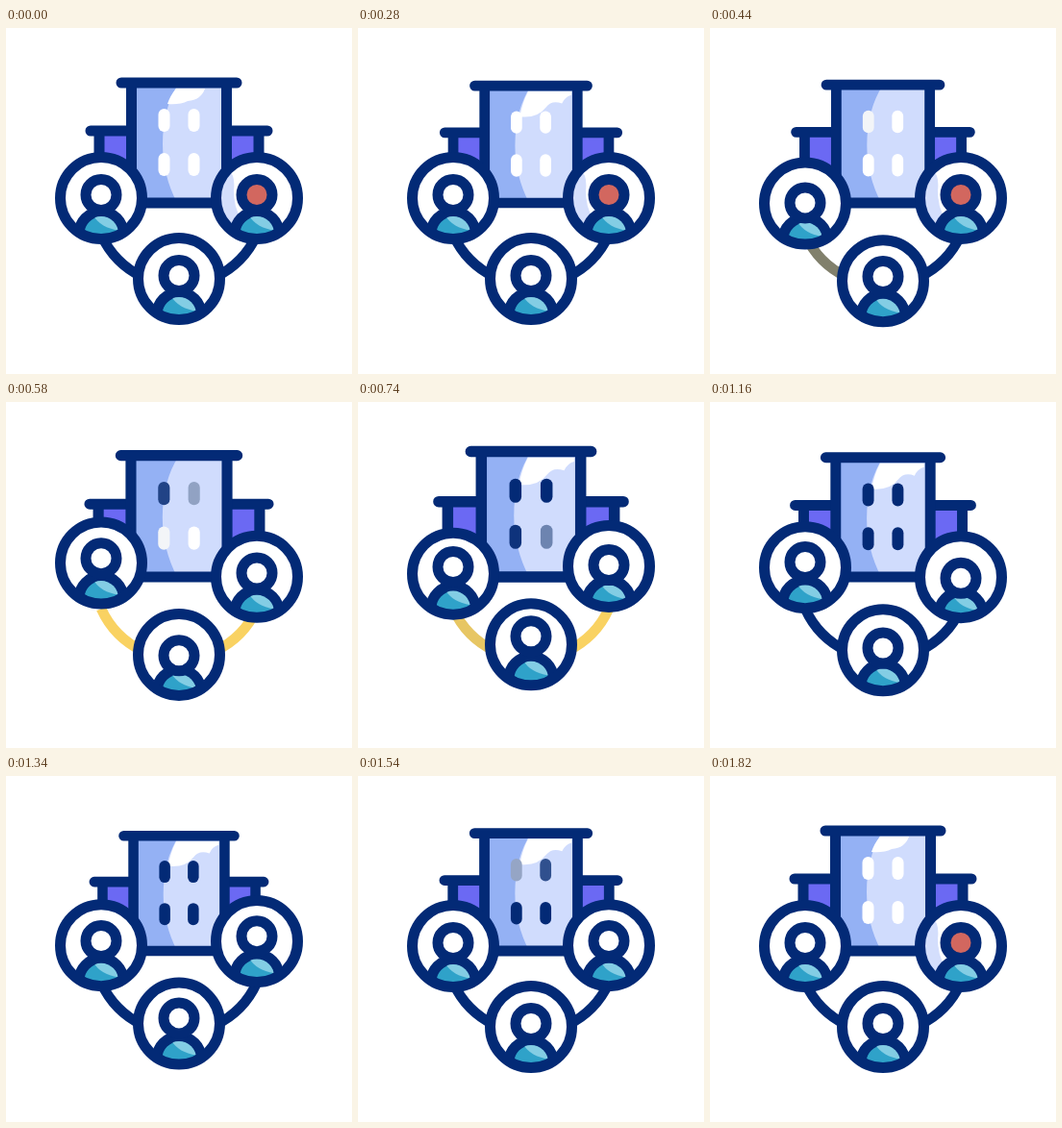
An HTML page for the animation above (2.18 s loop, 360 by 360 pixels).

```html
<!DOCTYPE html>
<html lang="en">
<head>
<meta charset="utf-8">
<title>Connected team</title>
<style>
  html, body { margin: 0; width: 100%; height: 100%; overflow: hidden; background: #fff; }
  svg { display: block; width: 100vw; height: 100vh; }
  .line { stroke: #032a76; stroke-width: 11; stroke-linecap: round; stroke-linejoin: round; }
</style>
</head>
<body>
<svg viewBox="0 0 360 360">
  <defs>
    <clipPath id="disc"><circle r="43"/></clipPath>
    <clipPath id="shirt"><circle cy="37" r="18"/></clipPath>
  </defs>
  <g id="links" fill="none" stroke-width="10.5">
    <path d="M99 215A90 90 0 0 0 142 259"/>
    <path d="M261 215A90 90 0 0 1 218 259"/>
  </g>
  <g id="building">
    <path d="M97 107H263V182H97Z" fill="#6b69f3"/>
    <path class="line" d="M88 107H272M97 107V160M263 107V160" fill="none"/>
    <path d="M130 57H230V182H130Z" fill="#d0dcfd"/>
    <path d="M130 57H180Q163 83 163 121Q163 153 178 182H130Z" fill="#94b1f4"/>
    <path id="glare" fill="#fff"/>
    <g id="windows"></g>
    <path class="line" d="M130.5 57V182H229.5V57M120 57H240" fill="none"/>
  </g>
  <g id="people"></g>
</svg>
<script>
const LOOP = 2180;
const $ = id => document.getElementById(id);
const NAVY = [3, 42, 118], WHITE = [255, 255, 255], YELLOW = [249, 210, 98];

// Tables of [time, value], joined by sine easing.
const SCALE = [[180, 1], [310, .972], [880, 1.056], [1360, .958], [1720, 1]];
const BOB = [[285, 0], [420, 6], [600, -10], [855, 10], [1130, -5], [1420, 0]];

function sample(steps, t) {
  if (t <= steps[0][0]) return steps[0][1];
  for (let i = 1; i < steps.length; i++) {
    const [t0, a] = steps[i - 1], [t1, b] = steps[i];
    if (t < t1) return a + (b - a) * (1 - Math.cos(Math.PI * (t - t0) / (t1 - t0))) / 2;
  }
  return steps[steps.length - 1][1];
}

const pulse = (t, on, off, fade) =>
  sample([[on, 0], [on + fade, 1], [off, 1], [off + fade, 0]], t);

const mix = (a, b, k) => `rgb(${a.map((v, i) => Math.round(v + (b[i] - v) * k))})`;

const windows = [[164.5, 96], [195.5, 96], [164.5, 142], [195.5, 142]].map(([x, y], i) => {
  $('windows').insertAdjacentHTML('beforeend',
    `<rect x="${x - 6}" y="${y - 12}" width="12" height="24" rx="6"/>`);
  return { node: $('windows').lastChild, on: 410 + i * 70, off: 1420 + i * 60 };
});

const people = [[99, 177, 0], [180, 261, 100], [261, 177, 200]].map(([x, y, delay]) => {
  const tint = delay === 200 ? '<path class="tint" d="M-30 -31Q-22 -23 -24 -8Q-24 9 -17 20L-30 31A43 43 0 0 1 -30 -31Z" fill="#d4defc"/>' : '';
  $('people').insertAdjacentHTML('beforeend', `<g>
    <circle r="43" fill="#fff"/>
    <g clip-path="url(#disc)">${tint}
      <g class="body">
        <circle class="line" cy="37" r="23" fill="#2fa2c9"/>
        <path clip-path="url(#shirt)" d="M-8 18Q-1 31 20 34V10H-8Z" fill="#83cde4"/>
      </g>
      <circle class="head line" r="16"/>
    </g>
    <circle class="line" r="42.5" fill="none"/>
  </g>`);
  const node = $('people').lastElementChild;
  const part = name => node.querySelector('.' + name);
  return { node, x, y, delay, head: part('head'), body: part('body'), tint: part('tint') };
});

const links = [...$('links').children];
const SMALL_GLARE = 'M177 63H207Q203 75 189 76Q181 80 168 79Q171 70 177 63Z';
const WIDE_GLARE = 'M177 63H223V67Q216 69 213 76Q202 72 196 80Q187 92 168 90Q171 74 177 63Z';

function draw(t) {
  const resting = t < 200 || t >= 1800;
  $('building').setAttribute('transform',
    `translate(180 182) scale(${sample(SCALE, t)}) translate(-180 -182)`);
  $('glare').setAttribute('d', resting ? SMALL_GLARE : WIDE_GLARE);
  $('glare').style.opacity = t > 420 && t < 700 ? 0 : 1;

  for (const w of windows) w.node.setAttribute('fill', mix(WHITE, NAVY, pulse(t, w.on, w.off, 220)));
  links.forEach((link, i) =>
    link.setAttribute('stroke', mix(NAVY, YELLOW, pulse(t, 380 + i * 60, 720 + i * 240, 120))));

  for (const p of people) {
    const time = t - p.delay;
    const bob = sample(BOB, time);
    const sway = 1.4 * sample(BOB, time - 25) - bob;
    p.node.setAttribute('transform', `translate(${p.x} ${p.y + bob})`);
    p.head.setAttribute('cy', -3.5 + sway);
    p.body.setAttribute('transform', `translate(0 ${sway * .3})`);
    const marked = p.tint && (t < 485 || t >= 1800);
    p.head.setAttribute('fill', marked ? '#d2675f' : '#fff');
    if (p.tint) p.tint.style.opacity = marked ? 1 : 0;
  }
}

const start = performance.now();
function tick() {
  draw((performance.now() - start) % LOOP);
  requestAnimationFrame(tick);
}
tick();
</script>
</body>
</html>
```
